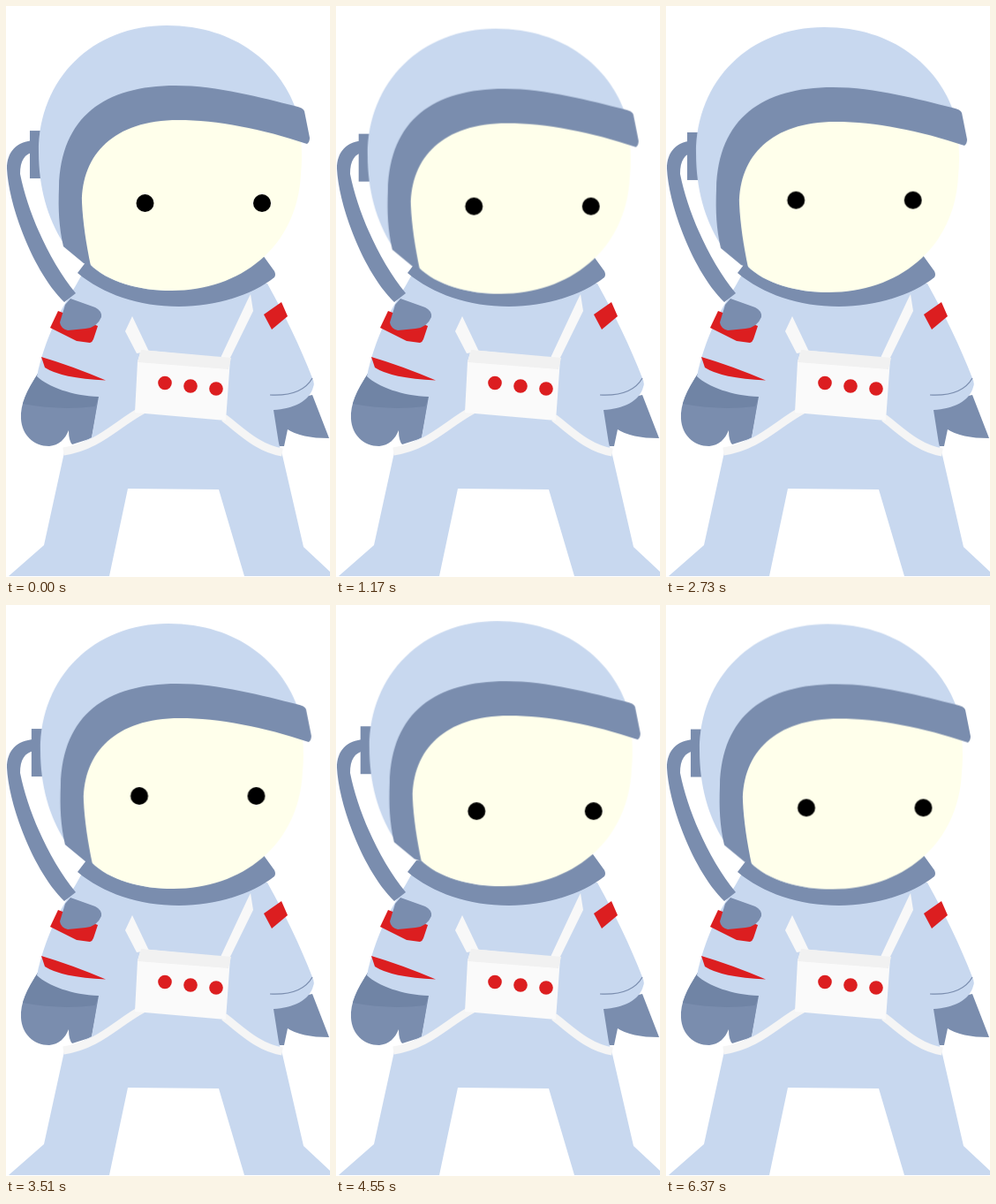
Animation of 367 by 646 pixels, one loop 6.5 s. Source, as an HTML page without scripts:

```html
<!DOCTYPE html>
<html lang="en">
<head>
<meta charset="utf-8">
<title>Astronaut</title>
<style>
  html, body { margin: 0; width: 100%; height: 100%; overflow: hidden; background: #fff; }
  svg { display: block; width: 100%; height: 100%; }

  .suit { fill: #c8d8ef; }
  .slate { fill: #7a8dae; }
  .skin { fill: #ffffeb; }
  .red { fill: #dc1e20; }
  .line { fill: none; stroke: #7a8dae; }
  .strap { fill: none; stroke: #f5f5f5; stroke-width: 9; }

  /* sine-shaped swings, entered at their midpoint */
  .drift { animation: drift 3250ms cubic-bezier(.364, 0, .636, 1) -1625ms infinite alternate; }
  .wobble { animation: wobble calc(6500ms / 6) cubic-bezier(.364, 0, .636, 1) calc(-6500ms / 12) infinite alternate; }
  .gaze { animation: gaze 6500ms ease-in-out infinite; }

  @keyframes drift {
    from { transform: translate(2px, -4px); }
    to { transform: translate(-2px, 4px); }
  }
  @keyframes wobble {
    from { transform: translateX(2px); }
    to { transform: translateX(-2px); }
  }
  @keyframes gaze {
    0%, 39% { transform: translate(0, 0); }
    43%, 60% { transform: translate(-8.4px, -6px); }
    64%, 96% { transform: translate(1px, 14px); }
    100% { transform: translate(0, 0); }
  }
</style>
</head>
<body>
<svg viewBox="0 0 367 646" preserveAspectRatio="none">
  <!-- gloves -->
  <path class="slate" d="M36 416C24 434 16 450 17 467C18 485 31 498 49 498C60 497 67 490 71 480Q71 492 75 496L97 489L106 440Z"/>
  <path fill="#7084a5" d="M36 416C28 429 22 440 19 450Q60 458 101 453L106 440Z"/>
  <path class="slate" d="M300 450L309 498H315L319 479Q334 489 366 489L347 440Z"/>

  <!-- suit -->
  <path class="suit" d="M87 302L78 318C61 345 44 376 35 419C48 431 75 441 105 442L97 488L66 505L43 610L3 645H117L138 546L241 547L270 645H367V640L337 612L313 508L309 495L303 457C325 456 344 447 348 431Q350 427 347 421C333 385 316 350 296 314Z"/>
  <path class="line" d="M299 440Q335 442 347 421" stroke-width="1.2"/>

  <!-- arm patches -->
  <path class="red" d="M59 345L50 364L80 379L95 381Q98 380 99 377L104 362Z"/>
  <path class="red" d="M40 397Q74 407 113 423.500Q62 421 44 409Z"/>
  <path class="red" d="M292 349L312 335L319 351L301 366Z"/>

  <!-- harness -->
  <path class="strap" d="M155 457C125 473 105 498 65 504"/>
  <path class="strap" d="M247 466C268 482 285 500 313 505"/>
  <path fill="#f8f8f8" d="M143 351L162 391L148 393L135 368ZM277 326L280 345L252 402L243 398L273 334Z"/>
  <path fill="#fafafa" d="M153 389L254 399L249 469L146 460L149 402Z"/>
  <path fill="#f1f1f1" d="M153 389L255 398L252 411L149 403Z"/>
  <g class="red">
    <circle cx="180" cy="426.500" r="7.800"/>
    <circle cx="209" cy="430" r="7.800"/>
    <circle cx="238" cy="433" r="7.800"/>
  </g>

  <!-- hose and collar -->
  <path class="slate" d="M32 152C12 153 1 165 1 184C3 225 30 300 66 335L79 325C50 290 25 235 16 190C16 175 21 167 32 165Z"/>
  <path class="slate" d="M73 331L101 341Q109 345 108 352Q103 364 90 365L70 367Q62 365 61 358L67 338Z"/>
  <path class="slate" d="M91 289L81 302C110 326 150 340 196 340C240 340 280 326 304 307Q306 304 304 300L291 282L190 295Z"/>

  <!-- head -->
  <g class="drift"><g class="wobble">
    <path class="slate" d="M27 141H42V195H27Z"/>
    <path class="suit" d="M37 165C37 82 98 22 182 22C262 22 310 68 327 113L188 322C150 322 115 312 95 292L65 268C47 240 37 205 37 165Z"/>
    <path class="skin" d="M95 292C60 215 70 110 195 110C240 120 290 130 334 148Q336 172 334 190C330 274 264 322 188 322C150 322 115 312 95 292Z"/>
    <path class="slate" d="M65 272C60 250 59 230 60 205C62 125 112 90 192 90C240 90 290 104 327 113Q337 115 338 119L344 149Q344 154 341 156C290 139 240 129 195 129C122 129 86 168 86 222C87 245 91 270 96 294L88 291Z"/>
    <g class="gaze">
      <circle cx="157.500" cy="223" r="10"/>
      <circle cx="290" cy="223" r="10"/>
    </g>
  </g></g>
</svg>
</body>
</html>
```
